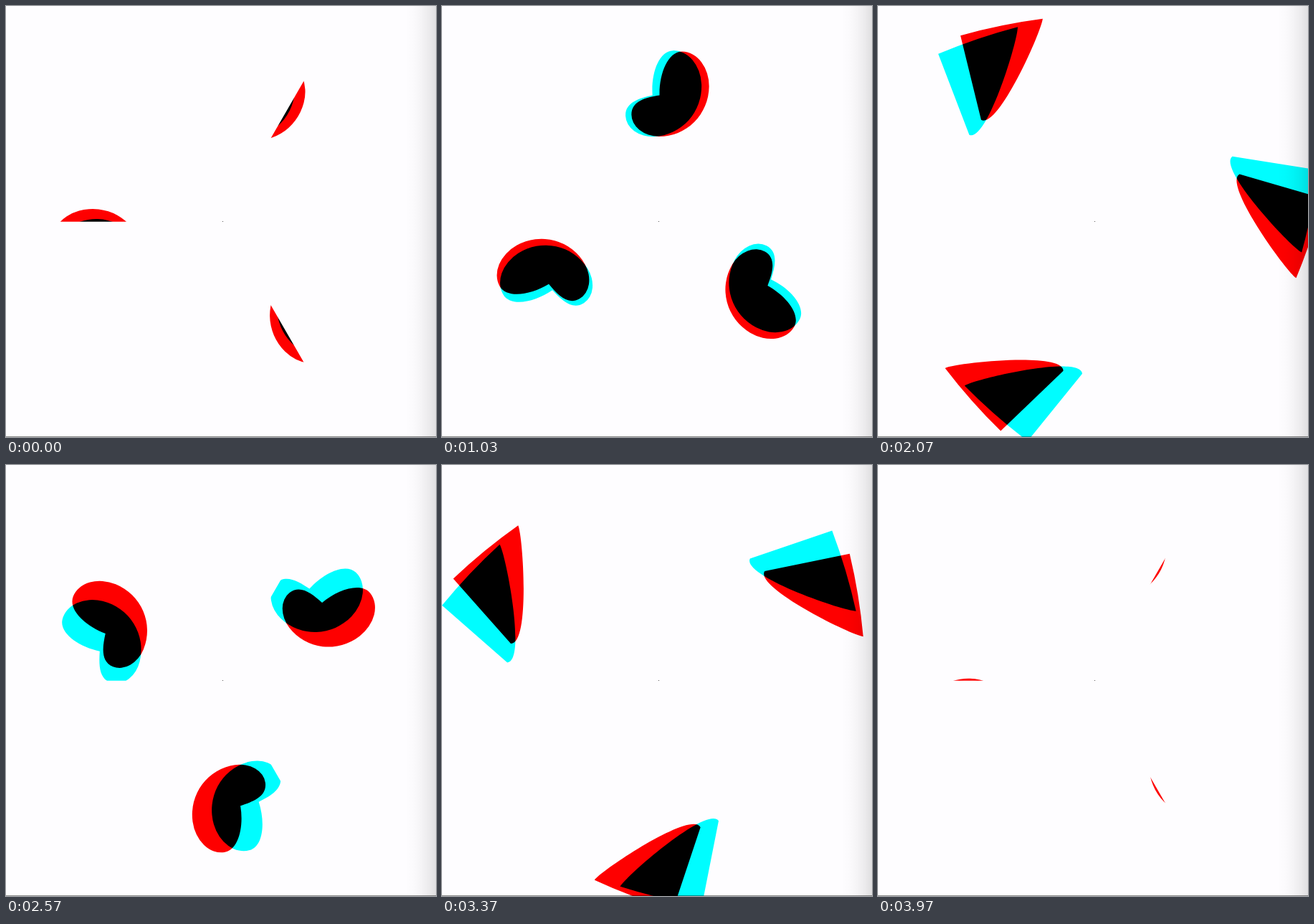
An HTML page with a canvas that plays this animation: 600 px wide and 601 px high, repeating every 4.01 s.

```html
<!DOCTYPE html>
<html lang="en">
<head>
<meta charset="utf-8">
<title>Threefold</title>
<style>
  html, body { margin: 0; width: 100%; height: 100%; overflow: hidden; background: #fefdff; }
  canvas { display: block; }
</style>
</head>
<body>
<canvas id="stage" width="600" height="601"></canvas>
<script>
const W = 600, H = 601, LOOP = 4010, STEPS = 120;
const CX = 302.3, CY = 300.7, PI = Math.PI, RAD = PI / 180;
const LAG = 2.86, EDGE = 558;
const ctx = document.getElementById('stage').getContext('2d');

// Both shapes sit on one disc that turns around (0, 0).
const shapes = new Path2D();

// Heart: a notch and three quarter ellipses.
shapes.moveTo(-176.3, 1);
shapes.bezierCurveTo(-206, 2, -237.5, -10, -237.5, -30);
shapes.ellipse(-189, -30, 48.5, 38, 0, PI, 1.5 * PI);
shapes.ellipse(-189, 1, 70.2, 69, 0, 1.5 * PI, 2 * PI);
shapes.ellipse(-149, 1, 30.3, 38.8, 0, 0, 0.5 * PI);
shapes.bezierCurveTo(-168, 39.8, -173, 20, -176.3, 1);
shapes.closePath();

// Triangle with one swollen side.
shapes.moveTo(292, -3);
shapes.bezierCurveTo(274.7, -9, 156.4, -101, 175.6, -120);
shapes.lineTo(296.6, -120);
shapes.quadraticCurveTo(298.5, -61, 292, -3);
shapes.closePath();

const sector = new Path2D();
sector.moveTo(0, 0);
sector.arc(0, 0, 900, PI, PI * 5 / 3);
sector.closePath();

const shade = ctx.createLinearGradient(EDGE, 0, W, 0);
for (let s = 0; s <= 1; s += 0.25) {
  shade.addColorStop(s, `rgba(0,0,0,${0.12 * s ** 1.8})`);
}

// Two turns per loop, with a swing in speed; u in degrees.
function turn(u) {
  return (2 * u - 67.1 + 57.6 * Math.sin((u - 243.7) * RAD)) * RAD;
}

// Thirty pictures a second, on a clock of 10 ms ticks.
function stepAt(ms) {
  const q = ms % 100;
  const n = 3 * Math.floor(ms / 100) + (q >= 30) + (q >= 70);
  return Math.min(n, STEPS - 1);
}

function layer(color, angle) {
  ctx.save();
  ctx.rotate(angle);
  ctx.fillStyle = color;
  ctx.fill(shapes);
  ctx.restore();
}

function box(color, x, y, w, h) {
  ctx.fillStyle = color;
  ctx.fillRect(x, y, w, h);
}

function draw(ms) {
  const u = stepAt(ms) * 360 / STEPS;
  box('#fefdff', 0, 0, W, H);
  box('#8c8c8c', 0, H - 1, W, 1);

  ctx.globalCompositeOperation = 'multiply';
  for (let k = 0; k < 3; k++) {
    ctx.save();
    ctx.translate(CX, CY);
    ctx.rotate(k * 120 * RAD);
    ctx.clip(sector);
    layer('#f00', turn(u));
    layer('#0ff', turn(u - LAG));
    ctx.restore();
  }
  ctx.globalCompositeOperation = 'source-over';

  box('#555', 302, 300, 1, 1);
  box(shade, EDGE, 0, W - EDGE, H);
}

const start = performance.now();
function tick() {
  draw((performance.now() - start) % LOOP);
  requestAnimationFrame(tick);
}
tick();
</script>
</body>
</html>
```
